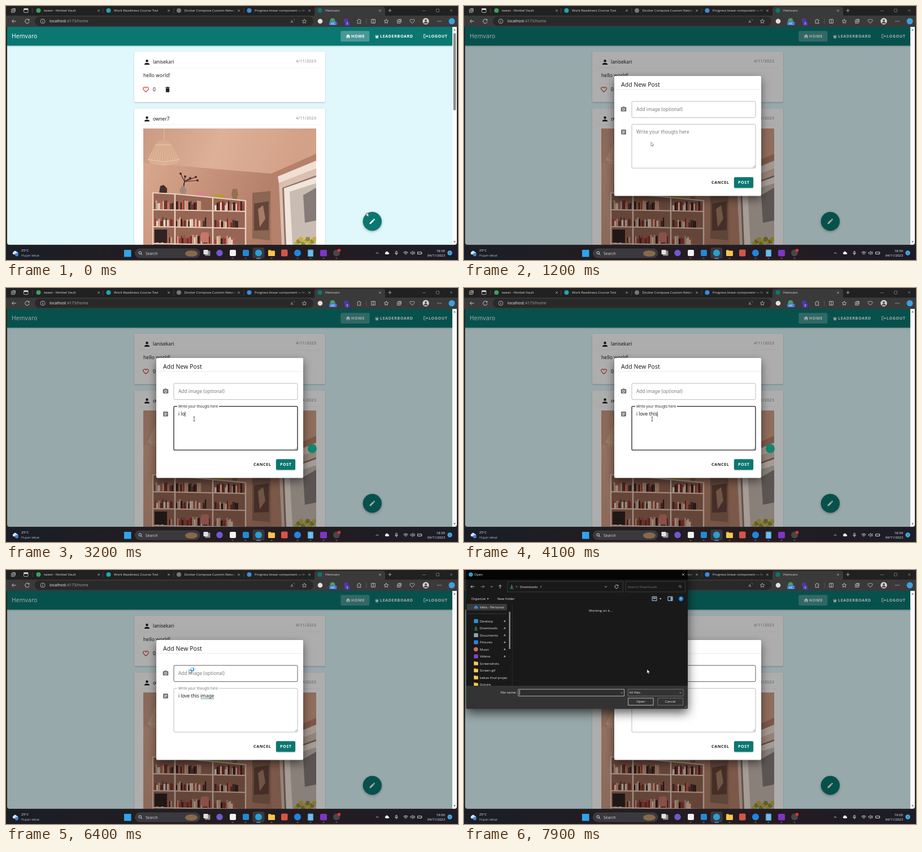
These frames come from a looping animation (800 by 450 pixels, 8000 ms). An HTML page with a canvas:

```html
<!DOCTYPE html>
<html lang="en">
<head>
<meta charset="utf-8">
<title>Add new post</title>
<style>
html, body { margin: 0; width: 100%; height: 100%; overflow: hidden; background: #1c1c1f; }
canvas { display: block; width: 800px; height: 450px; }
</style>
</head>
<body>
<canvas id="stage" width="800" height="450"></canvas>
<script>
const g = document.getElementById('stage').getContext('2d');
const LOOP = 8000, TEAL = '#0b7771';
const PAGE = '"Noto Sans", "Open Sans", sans-serif', UI = '"Open Sans", "Noto Sans", sans-serif';
const MESSAGE = 'i love this image';

const ICONS = {
  user: 'M12 4a4 4 0 0 1 0 8a4 4 0 0 1 0-8M12 14c4.4 0 8 1.8 8 4v2H4v-2c0-2.2 3.6-4 8-4',
  heart: 'M12 20C6 15 3 12 3 8.5C3 3.5 9.5 2.5 12 7C14.5 2.5 21 3.5 21 8.5C21 12 18 15 12 20z',
  trash: 'M19 4h-3.5l-1-1h-5l-1 1H5v2h14zM6 19a2 2 0 0 0 2 2h8a2 2 0 0 0 2-2V7H6z',
  pencil: 'M20.7 7c.4-.4.4-1 0-1.4l-2.3-2.3c-.4-.4-1-.4-1.4 0l-1.9 1.8 3.8 3.8zM3 17.2V21h3.8L17.8 9.9l-3.8-3.8z',
  home: 'M10 20v-6h4v6h5v-8h3L12 3 2 12h3v8z',
  crown: 'M3 6l4 8 1-10 4 10 4-10 1 10 4-8-3 12H6zM6 19h12v3H6z',
  exit: 'M17 7l-1.4 1.4 2.6 2.6H8v2h10.2l-2.6 2.6L17 17l5-5zM4 5h8V3H4c-1.1 0-2 .9-2 2v14c0 1.1.9 2 2 2h8v-2H4z',
  camera: 'M4 4h3l2-2h6l2 2h3a2 2 0 0 1 2 2v12a2 2 0 0 1-2 2H4a2 2 0 0 1-2-2V6a2 2 0 0 1 2-2M12 7a5 5 0 0 0 0 10a5 5 0 0 0 0-10M12 9a3 3 0 0 1 0 6a3 3 0 0 1 0-6',
  note: 'M5 3h14a2 2 0 0 1 2 2v14a2 2 0 0 1-2 2H5a2 2 0 0 1-2-2V5a2 2 0 0 1 2-2M7 7h10v2H7zM7 11h10v2H7zM7 15h7v2H7z',
  star: 'M12 3l2.7 6 6.3.6-4.8 4.3 1.4 6.3L12 17l-5.6 3.2 1.4-6.3L3 9.6 9.3 9z',
  back: 'M21 12H4M11 5l-7 7 7 7',
  next: 'M3 12h17M13 5l7 7-7 7',
  up: 'M12 21V4M5 11l7-7 7 7',
  down: 'M12 3v13M6 11l6 6 6-6M4 21h16',
  chevD: 'M5 9l7 7 7-7', chevU: 'M5 15l7-7 7 7', chevR: 'M9 5l7 7-7 7',
  reload: 'M19 7A8.5 8.5 0 1 0 20.5 13M20 3v5h-5',
  close: 'M5 5l14 14M19 5L5 19',
  plus: 'M12 3v18M3 12h18',
  lens: 'M10 4a6 6 0 0 1 0 12a6 6 0 0 1 0-12M14.5 14.5l6 6',
  split: 'M4 4h16v16H4zM12 4v16',
  stack: 'M4 7h13v13H4zM8 4h12v12M10 10v7M7 13.5h7',
  puzzle: 'M5 7h4c-1-5 7-5 6 0h4v5c-5-1-5 6 0 5v4H5z',
  cloud: 'M7 19a5 5 0 0 1 0-9a6 6 0 0 1 11 1a4 4 0 0 1 0 8z',
  wifi: 'M2 9q10-8 20 0M5 13q7-6 14 0M9 17q3-3 6 0',
  speaker: 'M3 9h4l6-5v16l-6-5H3zM16 8q4 4 0 8M19 5q7 7 0 14',
  battery: 'M2 8h17v9H2zM21 11v3',
  mic: 'M9 4h6v10H9zM6 11q0 7 6 7t6-7M12 18v4',
  pin: 'M9 3l12 12-3 1-4-1-4 5-5-5 5-4-1-4zM8 16l-5 5'
};
for (const k in ICONS) ICONS[k] = new Path2D(ICONS[k]);

const clamp = v => Math.max(0, Math.min(1, v));
const ramp = (t, a, b) => { const p = clamp((t - a) / (b - a)); return p * p * (3 - 2 * p); };
const mix = (a, b, p) => a + (b - a) * p;

function box(x, y, w, h, fill, r = 0, stroke, lw = 0.8) {
  g.beginPath();
  g.roundRect(x, y, w, h, r);
  if (fill) { g.fillStyle = fill; g.fill(); }
  if (stroke) { g.strokeStyle = stroke; g.lineWidth = lw; g.stroke(); }
}
function dot(x, y, r, fill) {
  g.beginPath(); g.arc(x, y, r, 0, 7);
  g.fillStyle = fill; g.fill();
}
function poly(fill, ...p) {
  g.beginPath();
  for (let i = 0; i < p.length; i += 2) g.lineTo(p[i], p[i + 1]);
  g.closePath(); g.fillStyle = fill; g.fill();
}
function line(color, lw, ...p) {
  g.beginPath();
  for (let i = 0; i < p.length; i += 2) g.lineTo(p[i], p[i + 1]);
  g.strokeStyle = color; g.lineWidth = lw; g.stroke();
}
function blend(x1, y1, x2, y2, ...colors) {
  const f = g.createLinearGradient(x1, y1, x2, y2);
  colors.forEach((c, i) => f.addColorStop(i / (colors.length - 1), c));
  return f;
}
function icon(name, x, y, size, color, lw) {
  const s = size / 24;
  g.save();
  g.translate(x - size / 2, y - size / 2);
  g.scale(s, s);
  if (lw) { g.strokeStyle = color; g.lineWidth = lw / s; g.stroke(ICONS[name]); }
  else { g.fillStyle = color; g.fill(ICONS[name], 'evenodd'); }
  g.restore();
}
function text(s, x, y, size, color, o = {}) {
  g.font = `${o.weight || 400} ${size}px ${o.font || UI}`;
  g.letterSpacing = (o.ls || 0) + 'px';
  g.textAlign = o.align || 'left';
  g.fillStyle = color;
  g.fillText(s, x, y);
  return g.measureText(s).width;
}
const copy = (s, x, y, color = '#1d1d1d', size = 8.33, ls = 0) => text(s, x, y, size, color, { font: PAGE, ls });
const caps = (s, x, y, color) => text(s, x, y, 7.1, color, { font: PAGE, weight: 600, ls: 0.62 });
function shadow(blur, dy, alpha, draw) {
  g.save();
  g.shadowColor = `rgba(0,0,0,${alpha})`; g.shadowBlur = blur; g.shadowOffsetY = dy;
  draw();
  g.restore();
}
function seeded(n) {
  return () => (n = (n * 16807) % 2147483647) / 2147483647;
}

function books(x, right, base, rnd) {
  const tones = ['#7d2a25', '#e5cab6', '#33211f', '#a83f33', '#cfa28a', '#4a3531', '#b3654f', '#f0dccb'];
  while (x < right - 3) {
    const w = 1.4 + rnd() * 2.4, h = 9 + rnd() * 8;
    box(x, base - h, w, h, tones[Math.floor(rnd() * 8)]);
    x += w + 0.3;
  }
}

function photo() {
  g.save();
  g.beginPath(); g.rect(243, 217, 306, 206); g.clip();
  box(243, 217, 306, 206, blend(243, 280, 500, 410, '#d9a78e', '#c28d76', '#a8745f'));
  poly(blend(243, 217, 500, 300, '#cb9a82', '#ddb098', '#d3a188'), 243, 217, 549, 217, 549, 262, 470, 297, 243, 278);
  poly('#b5816b', 470, 297, 549, 262, 549, 423, 470, 423);
  // pendant lamp
  line('#e9c9b4', 0.8, 280, 217, 280, 237);
  poly('#dcb294', 273, 237, 287, 237, 293, 246, 307, 272, 303, 279, 280, 283, 256, 279, 251, 272, 264, 246);
  for (let i = 0; i < 11; i++) line('#c4967a', 0.5, 274 + i * 1.2, 237, 265 + i * 2.8, 247, 253 + i * 5.2, 279);
  line('#f0d3bd', 0.8, 264, 246, 293, 246);
  line('#f0d3bd', 0.8, 251, 272, 280, 276, 307, 272);
  // ornaments
  poly('#41302d', 271, 331, 273, 319, 279, 317, 285, 323, 285, 331);
  for (const [x, y] of [[309, 297], [317, 302], [326, 305], [336, 303], [339, 309]]) {
    line('#4c2828', 1.2, 314, 321, 316, 311, x, y);
    dot(x, y, 2, '#4c2828');
  }
  poly('#a28a7a', 311, 319, 316, 319, 320, 327, 317, 334, 310, 334, 307, 327);
  box(336, 329, 16, 8, '#d6858a', 4);
  box(366, 334, 21, 8, '#bb9738', 2);
  poly('#94704f', 401, 324, 409, 324, 411, 334, 408, 343, 402, 343, 399, 334);
  // shelves
  poly('#966554', 259, 331, 300, 333, 425, 345, 425, 423, 259, 423);
  const rnd = seeded(71);
  for (let r = 0; r < 3; r++) {
    const y = 361 + r * 30;
    books(263, 297, y - 1, rnd);
    books(301, 350 + r * 6, y, rnd);
    books(369, 421 - r * 7, y + 2, rnd);
    line('#ecd2c1', 2, 259, y, 300, y + 0.5, 425, y + 3);
  }
  box(263, 396, 22, 23, '#2e2322');
  box(345, 401, 14, 18, '#c8756b', 4);
  line('#ecd2c1', 2.2, 259, 331, 300, 333, 425, 345);
  for (const [x, y] of [[260, 331], [299, 333], [366, 339], [424, 345]]) line('#ecd2c1', 2.4, x, y, x, 423);
  // poster
  poly('#8a6653', 436, 331, 468, 328, 467, 415, 436, 412);
  poly('#65443a', 439, 350, 465, 346, 465, 397, 439, 398);
  poly('#a57d65', 446, 360, 455, 353, 459, 377, 449, 392);
  // window
  poly('#f0dfd3', 481, 302, 549, 274, 549, 288, 483, 314);
  poly('#d9c0b1', 483, 314, 549, 288, 549, 423, 488, 423);
  poly('#8e7567', 489, 322, 549, 300, 549, 423, 493, 423);
  poly('#f2e5db', 492, 323, 549, 303, 549, 423, 496, 423);
  poly('#c9bdb3', 502, 329, 549, 314, 549, 423, 507, 423);
  poly('#857b78', 526, 335, 549, 322, 549, 380, 529, 384);
  for (let i = 0; i < 9; i++) dot(514 + i * 4, 421 - (i % 3) * 4, 4, i % 2 ? '#8f8c35' : '#c3b13c');
  g.restore();
}

function card(y, h, name, dateY) {
  shadow(1.8, 0.7, 0.32, () => box(227, y, 338, h, '#fff', 2));
  icon('user', 249.5, y + 18.5, 13.5, '#1c1c1c');
  copy(name, 260, y + 21);
  text('4/11/2023', 549, dateY, 7.3, '#8a8a8a', { font: PAGE, align: 'right', ls: 0.15 });
  line('#f0f0f0', 0.7, 235, y + 28.8, 557, y + 28.8);
}

function page(t) {
  box(2, 37, 796, 386, '#e0f8fb');
  card(81, 89.5, 'lanisekari', 99.5);
  copy('hello world!', 243, 126, '#1d1d1d', 8.33, 0.17);
  icon('heart', 247.5, 148, 13, '#bb4430', 1.2);
  copy('0', 260, 151);
  icon('trash', 286, 148, 12.5, '#1c2228');
  card(181.5, 260, 'owner7', 200.5);
  photo();
  shadow(3, 1, 0.35, () => box(2, 37, 788, 33.3, TEAL));
  copy('Hemvaro', 10, 57.3, '#f0fafa', 10.4, 0.1);
  box(592.3, 44.2, 51, 18.8, 'rgba(255,255,255,.25)', 2);
  icon('home', 605.5, 53.5, 9.5, '#fff');
  caps('HOME', 611, 56.2, '#fff');
  icon('crown', 656.5, 53.5, 9, '#fff');
  caps('LEADERBOARD', 662, 56.2, '#fff');
  icon('exit', 743, 53.5, 9.5, '#fff');
  caps('LOGOUT', 748, 56.2, '#fff');
  shadow(4, 1.5, 0.3, () => dot(648.3, 381.5, 16.7, TEAL));
  const press = ramp(t, 330, 480) * (1 - ramp(t, 650, 850));
  if (press) dot(648.3, 381.5, 16.7, `rgba(224,240,240,${0.58 * press})`);
  icon('pencil', 648.3, 381.5, 12.5, '#fff');
}

function scrollbar(open) {
  box(790, 37, 8, 386, '#fbfbfb');
  if (!open) box(791.7, 48, 4.6, 137, '#8b8b8b', 2.3);
  poly('#777', 792, 43.5, 796, 43.5, 794, 40.5);
  poly('#777', 792, 416.5, 796, 416.5, 794, 419.5);
}

function form(t) {
  const show = ramp(t, 640, 900);
  if (!show) return;
  box(2, 37, 788, 386, `rgba(0,0,0,${0.32 * show})`);
  const focus = t >= 1900 && t < 6200;
  if (t >= 2100 && t < 6200) dot(542, 284.5, 8, '#12876f');
  g.save();
  g.globalAlpha = show;
  const s = mix(0.8, 1, show);
  g.translate(396, 230); g.scale(s, s); g.translate(-396, -230);
  shadow(16, 6, 0.5, () => box(266, 124, 260, 212.5, '#fff', 2));
  text('Add New Post', 278, 142.7, 10.4, '#1d1d1d', { font: PAGE, weight: 500, ls: 0.08 });
  line('#e4e4e4', 0.8, 266, 148, 526, 148);

  icon('camera', 282.5, 183, 11.5, '#6c6c6c');
  box(297, 169, 219, 28.7, '#fff', 2, t > 5250 ? '#4a4a4a' : '#b4b4b4', 0.9);
  copy('Add image (optional)', 305, 186.2, '#7a7a7a');

  icon('note', 282.5, 223.3, 11.5, '#6c6c6c');
  box(297, 209.7, 219, 77.5, '#fff', 2, focus ? '#222' : '#b4b4b4', focus ? 1.3 : 0.9);
  line('#555', 0.6, 511.5, 286, 515, 282.5);
  line('#555', 0.6, 513.5, 286, 515, 284.5);
  const lift = ramp(t, 1900, 2050);
  if (lift > 0.5) box(303, 208, 74, 4, '#fff');
  copy('Write your thougts here', 305, mix(226.2, 212, lift), focus ? '#2c2c2c' : '#7a7a7a', mix(8.33, 6.25, lift));

  const count = t < 2750 ? 0 : Math.min(MESSAGE.length, 1 + Math.floor((t - 2750) / 125));
  const w = copy(MESSAGE.slice(0, count), 305, 226.2);
  const typing = t > 2750 && t < 4900;
  const since = t < 2750 ? t - 1900 : t - 4900;
  if (focus && (typing || since % 1000 < 500)) line('#111', 0.8, 305.5 + w, 219, 305.5 + w, 228);
  if (t > 5500) line('#2a8b83', 0.9, 344.5, 228, 368, 228);

  caps('CANCEL', 438, 315.4, '#1d1d1d');
  shadow(2, 1, 0.35, () => box(478, 303.3, 34, 18.7, TEAL, 2));
  caps('POST', 485, 315.4, '#fff');
  g.restore();
}

function tab(x, label, favicon, closeX) {
  dot(x, 8, 4, favicon);
  const end = closeX - 5;
  text(label, x + 9.5, 10.3, 6, blend(end - 10, 0, end, 0, '#d8d8d8', 'rgba(216,216,216,0)'));
  icon('close', closeX, 8.2, 6, '#c8c8c8', 0.7);
}

function browser() {
  const pale = '#d5d5d5', faint = '#8a8a8a';
  box(0, 0, 800, 18, '#212122');
  box(0, 17, 800, 20, '#3a3a3b');
  box(546, 1.5, 125, 17, '#3a3a3b', [4, 4, 0, 0]);
  icon('stack', 13, 8, 10, pale, 0.8);
  box(31.5, 4.5, 7.5, 7, null, 1, pale, 0.8);
  box(31.5, 4.5, 7.5, 2.5, pale);
  for (const x of [47, 171.5, 297, 421]) line('#4b4b4b', 0.8, x, 4, x, 13);
  tab(57.5, 'tweet - Nimbel Vault', '#3da25a', 164);
  tab(181.5, 'Work Readiness Course Tovi', '#24a5b5', 288);
  tab(306, 'Docker Compose Custom Network', '#777', 412);
  tab(430.5, 'Progress linear component — Vuetify', '#3b8de0', 537);
  tab(555.5, 'Hemvaro', TEAL, 662);
  icon('plus', 679.5, 8, 8, pale, 0.7);
  line(faint, 0.7, 737, 8.5, 743, 8.5);
  box(761.5, 5.5, 5, 5, null, 0.5, faint, 0.7);
  icon('close', 788, 8, 7, faint, 0.7);

  icon('back', 14, 27, 10, pale, 0.9);
  icon('reload', 37.5, 27, 10.5, pale, 0.9);
  box(51, 18.8, 493, 16.5, '#29292a', 8);
  g.beginPath(); g.arc(65, 27, 4, 0, 7); g.strokeStyle = pale; g.lineWidth = 0.7; g.stroke();
  line(pale, 0.8, 65, 26, 65, 29.3);
  dot(65, 24.7, 0.5, pale);
  const w = text('localhost', 77, 29.4, 7, '#f0f0f0');
  text(':4173/home', 77 + w, 29.4, 7, '#a5a5a5');
  text('A', 503.5, 29.5, 7.5, '#aaa');
  line('#aaa', 0.6, 509, 22.5, 511, 25.5);
  icon('star', 528, 27, 10, pale, 0.7);
  dot(556, 27, 4.3, '#e4e0da');
  dot(578, 26, 4.5, '#4d9a69');
  box(572, 27.5, 13.5, 6.5, '#3978d4', 1.5);
  text('ABC', 578.7, 32.7, 4.6, '#fff', { align: 'center' });
  dot(602, 26, 4, '#5535a5');
  box(600, 28, 8, 6.5, '#533bc7', 1.5);
  text('5', 604, 33, 5, '#fff', { align: 'center' });
  icon('puzzle', 625, 27, 10, pale, 0.8);
  line('#666', 0.7, 638, 22, 638, 32);
  icon('split', 650, 27, 10, pale, 0.8);
  icon('star', 673, 27, 10, pale, 0.8);
  icon('stack', 696, 27, 10, pale, 0.8);
  icon('heart', 719, 27, 10.5, pale, 0.8);
  dot(743, 27, 5.7, '#d9d5d2');
  dot(743, 25.5, 2, '#5c514d');
  g.beginPath(); g.arc(743, 31, 3.5, Math.PI, 0); g.fillStyle = '#5c514d'; g.fill();
  for (let i = -1; i < 2; i++) dot(767 + i * 2.7, 27, 0.7, pale);
  dot(789, 27, 5.5, '#3f9fe0');
}

function taskbar(t) {
  // frame around the page with rounded lower corners
  g.beginPath();
  g.rect(0, 37, 800, 413);
  g.roundRect(2, 37, 796, 386, [0, 0, 4, 4]);
  g.fillStyle = '#232226'; g.fill('evenodd');
  box(0, 425, 800, 25, blend(0, 0, 800, 0, '#1a1e27', '#221d20', '#241b21', '#1c1d27'));
  icon('cloud', 16, 436.5, 13, '#dbe3ed');
  dot(19, 440.5, 3, '#3a87dc');
  text('25°C', 27, 435.4, 6, '#f2f2f2');
  text('Hujan lebat', 27, 444, 6, '#bcbcc0');
  box(209, 432, 12.5, 12.5, '#2fa5ec');
  box(228.5, 430, 114.5, 16, '#3a393d', 8, '#4a4a50', 0.6);
  icon('lens', 238, 438, 9, '#eee', 0.9);
  text('Search', 247, 440.6, 6.9, '#d6d6d8');
  g.beginPath(); g.ellipse(328, 438.5, 11, 5.5, 0, 0, 7); g.fillStyle = '#87694a'; g.fill();
  box(436.5, 428, 21, 19, '#3a383d', 3);
  box(352, 433.5, 9.5, 9, '#8b8b8f', 1);
  box(349.5, 432, 8, 8, '#e1e1e3', 1);
  dot(378, 437.5, 5.7, '#7058cf');
  box(396, 432, 11, 11, '#f1f1f1', 2);
  box(419, 432, 11, 11, '#2489d4', 2);
  dot(447, 437.5, 6, '#2b9fcf');
  box(464, 432, 5, 3, '#d89c2b', 1);
  box(464, 433.5, 12, 9.5, '#f5c64e', 1);
  box(487, 431.5, 11.5, 12, '#d4564a', 2);
  dot(516, 437.5, 6, '#2186e0');
  box(534, 431.5, 10, 12.5, '#52aee3', 1.5);
  for (let i = 0; i < 3; i++) line('#dceefa', 0.7, 536, 435 + i * 3, 542, 435 + i * 3);
  box(556, 432, 12, 11.5, '#7d36c4', 2);
  dot(585, 437.5, 6, '#47464a');
  dot(589.5, 433, 2.8, '#e2322f');
  for (const x of [401, 424, 470, 516, 539, 562, 585]) line('#8f8f93', 1, x - 1.5, 447, x + 1.5, 447);
  box(443, 446.5, 8, 1.2, '#63b5ea', 0.6);
  icon('chevU', 657, 438, 8, '#eee', 0.8);
  icon('cloud', 674, 437, 10, '#eee');
  icon('mic', 691, 437.5, 9, '#eee', 0.7);
  icon('wifi', 707.5, 438, 9.5, '#eee', 0.9);
  icon('speaker', 719.5, 437.5, 9, '#eee', 0.7);
  icon('battery', 732.5, 437.5, 9.5, '#eee', 0.9);
  text(t < 5900 ? '18:59' : '19:00', 777, 435.8, 6, '#f2f2f2', { align: 'right' });
  text('04/11/2023', 777, 444.2, 5.9, '#f2f2f2', { align: 'right' });
  dot(785.5, 437.5, 4.2, '#49a8e6');
  text('1', 785.5, 439.7, 5.5, '#101820', { align: 'center' });
}

function picker() {
  const pale = '#e8e8e8', dim = '#999';
  shadow(18, 7, 0.65, () => box(4, 0, 392, 246, '#191919', 3));
  box(4, 0, 392, 17, '#050505');
  dot(12, 8, 3.8, '#2b9fcf');
  text('Open', 18, 10.3, 6, pale);
  icon('close', 388, 8, 6.5, pale, 0.7);
  icon('back', 15, 29.5, 9, pale, 0.8);
  icon('next', 33, 29.5, 9, dim, 0.8);
  icon('chevD', 49, 29.5, 6.5, pale, 0.8);
  icon('up', 64, 29.5, 9, pale, 0.8);
  box(77, 20.3, 204.5, 18.5, '#191919', 0, '#484848', 0.7);
  icon('down', 84.5, 29.5, 9, '#3dbb83', 1);
  icon('chevR', 93, 29.5, 5.5, pale, 0.7);
  text('Downloads', 99, 31.6, 6, pale);
  icon('chevR', 136, 29.5, 5.5, pale, 0.7);
  icon('chevD', 251, 29.5, 6.5, pale, 0.8);
  icon('reload', 270, 29.5, 8.5, pale, 0.8);
  box(286, 20.3, 105.5, 18.5, '#191919', 0, '#484848', 0.7);
  text('Search Downloads', 290, 31.6, 6, '#777');
  icon('lens', 383, 29.5, 7, dim, 0.7);
  text('Organize', 13, 53.2, 6, pale);
  poly(pale, 40.5, 50.2, 44, 50.2, 42.2, 52.3);
  text('New folder', 59, 53.2, 6, pale);
  box(333, 47.3, 8, 7, '#191919', 0, pale, 0.9);
  box(334.5, 48.8, 5, 2.5, '#6aa9dc');
  poly(pale, 346, 50, 349.5, 50, 347.7, 52.2);
  box(361, 47.3, 8, 7, '#191919', 0, pale, 0.9);
  box(365.5, 47.3, 3.5, 7, '#5ea9e0');
  dot(384, 51, 4.2, '#1b83d8');
  text('?', 384, 53.2, 6, '#fff', { align: 'center', weight: 700 });

  g.save();
  g.beginPath(); g.rect(4, 59, 392, 146); g.clip();
  box(5, 60, 71, 11.5, '#3a3a3a');
  icon('cloud', 21, 65.5, 10, '#2c8fe0');
  text('Velia - Personal', 28, 67.9, 6, pale);
  line('#444', 0.7, 5, 77.5, 76, 77.5);
  const rows = ['Desktop', 'Downloads', 'Documents', 'Pictures', 'Music', 'Videos', 'Screenshots', 'Screen gif', 'bekas final projec', 'Dolvire'];
  const tints = ['#2491dc', '', '#8aa7bf', '#2a86d8', '#d2705f', '#8444c6'];
  rows.forEach((name, i) => {
    const y = 90.5 + i * 12.5;
    if (i === 1) icon('down', 21, y, 9, '#3dbb83', 1);
    else if (i === 4) dot(21, y, 3.8, tints[i]);
    else if (i < 6) box(17.5, y - 3.5, 7.5, 7, tints[i], 1);
    else { box(17.5, y - 3.7, 3.5, 2, '#d89c2b'); box(17.5, y - 2.7, 7.5, 6, '#f6cb55', 0.7); }
    text(name, 28, y + 2.2, 6, pale);
    if (i < 6) icon('pin', 72, y, 6, '#aaa');
  });
  box(79.5, 74, 2.6, 66, '#8a8a8a');
  line('#2d2d2d', 0.8, 85.5, 59, 85.5, 205);
  text('Working on it...', 221, 73.7, 6, pale);
  g.restore();

  box(4, 205, 392, 41, '#333334', [0, 0, 3, 3]);
  text('File name:', 93, 219.3, 6, pale, { align: 'right' });
  box(96, 211.3, 187.5, 12, '#2e2e2f', 0, '#d0d0d0', 0.8);
  line('#fff', 0.7, 98.5, 213, 98.5, 221.5);
  icon('chevD', 279, 217.3, 5, pale, 0.7);
  box(290.4, 211.3, 97.5, 12, '#333334', 0, '#8a8a8a', 0.7);
  text('All files', 292.5, 219.3, 6, pale);
  icon('chevD', 383, 217.3, 5, pale, 0.7);
  box(290.7, 227, 44.5, 12.5, '#333334', 0, '#c4c4c4', 0.9);
  text('Open', 313, 235.3, 6, pale, { align: 'center' });
  box(343, 227, 44.5, 12.5, '#333334', 0, '#8a8a8a', 0.7);
  text('Cancel', 365, 235.3, 6, pale, { align: 'center' });
  for (let i = 0; i < 3; i++) line('#999', 0.7, 394.5 - i * 2, 244.5, 394.5, 244.5 - i * 2);
}

// pointer stops: time, x, y
const STOPS = [[0, 638, 366], [150, 638, 366], [420, 643, 376], [700, 643, 376], [1150, 331, 241], [1500, 331, 241],
  [1850, 333, 232], [4400, 333, 232], [4950, 339.5, 202], [5150, 339.5, 202], [5800, 324, 176], [LOOP, 324, 176]];

function pointer(t) {
  const i = STOPS.findIndex(s => s[0] > t), [ta, xa, ya] = STOPS[i - 1], [tb, xb, yb] = STOPS[i];
  const p = ramp(t, ta, tb), x = mix(xa, xb, p), y = mix(ya, yb, p);
  if (t > 1600 && t < 5900) {
    line('#333', 0.8, x, y - 3.5, x, y + 3.5);
    line('#333', 0.8, x - 1.5, y - 3.7, x + 1.5, y - 3.7);
    line('#333', 0.8, x - 1.5, y + 3.7, x + 1.5, y + 3.7);
    return;
  }
  g.save();
  g.translate(x, y);
  poly('#fff', 0, 0, 0, 7, 1.6, 5.6, 2.7, 8, 3.8, 7.5, 2.7, 5.2, 4.9, 5);
  g.strokeStyle = '#333'; g.lineWidth = 0.5; g.stroke();
  g.restore();
  if (t > 6250 && t < 7400) {
    const ring = (from, to, color) => {
      g.beginPath(); g.arc(x + 5.7, y, 2.7, from, to);
      g.strokeStyle = color; g.lineWidth = 1.6; g.stroke();
    };
    ring(0, 7, '#9dd3f3');
    ring(t / 130, t / 130 + 4, '#1688d4');
  }
}

function frame(t) {
  g.clearRect(0, 0, 800, 450);
  page(t);
  form(t);
  scrollbar(t > 650);
  browser();
  taskbar(t);
  if (t >= 7400) {
    g.save();
    g.globalAlpha = clamp((t - 7350) / 150);
    picker();
    g.restore();
  }
  pointer(t);
}

const start = performance.now();
function tick() {
  frame((performance.now() - start) % LOOP);
  requestAnimationFrame(tick);
}
tick();
</script>
</body>
</html>
```
